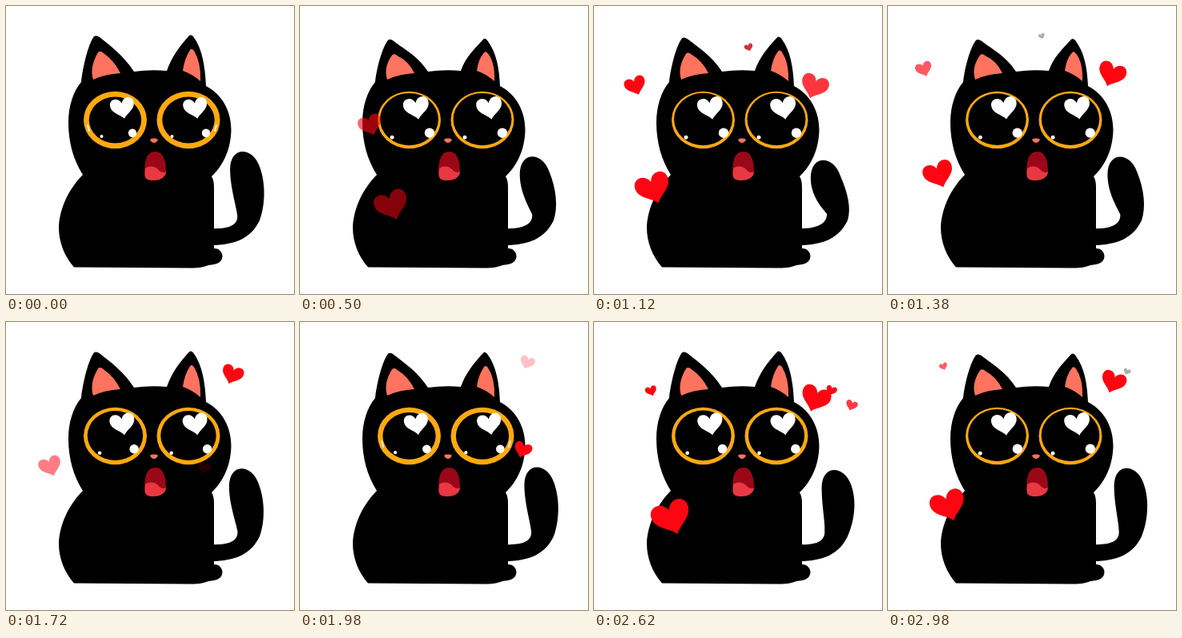
An HTML page with a canvas for the animation above (3000 ms loop, 360 px wide and 360 px high).

```html
<!DOCTYPE html>
<html lang="en">
<head>
<meta charset="utf-8">
<title>Smitten cat</title>
<style>
  html, body { margin: 0; width: 100%; height: 100%; overflow: hidden; background: #fff; }
  canvas { display: block; }
</style>
</head>
<body>
<canvas id="stage" width="360" height="360"></canvas>
<script>
const ctx = document.getElementById('stage').getContext('2d');
const LOOP = 3000;

const HEART = new Path2D('M0 .45C-.14 .24-.5 .14-.5-.16C-.5-.47-.1-.5 0-.2C.1-.5 .5-.47 .5-.16C.5 .14 .14 .24 0 .45Z');
const MOUTH = 'M187 182C197 182 200 195 200 206C199 215 191 218 184 218C177 218 173 216 173.500 209C173 195 175 182 187 182Z';
const TONGUE = 'M174 203C179 199 186 200 190 204C193 208 197 209 200 207C200 215 191 218 184 218C177 218 173 216 173.500 209Z';
const NOSE = 'M180 167Q181 165 185 165.500Q189 165 190 167Q188 171 185 171Q182 171 180 167Z';

// Hearts drift outwards while they rise; a higher lift starts the rise more slowly
const chest = { life: 1610, from: [128, 250], to: [54, 154], size: 50, lift: 2 };
const brow = { life: 1100, from: [272, 110], to: [284, 46], size: 38 };
const HEARTS = [
  { born: 360, life: 1260, from: [100, 160], to: [43, 60], size: 34 },
  { born: 350, ...chest },
  { born: 600, life: 960, from: [199, 80], to: [192, 28], size: 13, greys: true },
  { born: 960, ...brow },
  { born: 1690, life: 1200, from: [243, 185], to: [326, 81], size: 23 },
  { born: 2000, life: 1200, from: [80, 139], to: [69, 37], size: 17 },
  { born: 2240, ...chest },
  { born: 2250, life: 900, from: [292, 110], to: [299, 51], size: 15, greys: true },
  { born: 2380, ...brow },
];

const mix = (a, b, k) => a + (b - a) * k;
const unit = v => Math.min(1, Math.max(0, v));
const bell = (t, peak, width) => Math.exp(-(((t - peak) / width) ** 2));

function fill(path, color) {
  ctx.fillStyle = color;
  ctx.fill(new Path2D(path));
}

function ellipse(x, y, rx, ry, color) {
  ctx.fillStyle = color;
  ctx.beginPath();
  ctx.ellipse(x, y, rx, ry, 0, 0, 7);
  ctx.fill();
}

function heart(x, y, width, tilt, color) {
  ctx.save();
  ctx.translate(x, y);
  ctx.rotate(tilt * Math.PI / 180);
  ctx.scale(width, width);
  fill(HEART, color);
  ctx.restore();
}

// The base stays put while the tip swings left and sinks
function tail(lean) {
  const p = (x, y, k = 1) => `${x - 11 * lean * k} ${y + 13 * Math.abs(lean) * k} `;
  fill(`M256 278C275 279 ${p(290, 276, -.2)}${p(289, 262, -.2)}C${p(288, 249, .3)}${p(281, 225)}${p(281, 203)}
    C${p(281, 174)}${p(309, 174)}${p(318, 200)}C${p(326, 222, .9)}${p(324, 250, .2)}317 268C307 289 288 299 256 299Z`, '#000');
}

function body(drop) {
  const l = 37 + drop, r = 36 + drop, inner = drop * .75;
  fill(`M94 95C96 76 103 ${l + 10} 110 ${l + 1}Q113 ${l - 1} 117 ${l + 2}C131 ${l + 13} 147 62 160 82
    Q181 79 201 81C207 64 217 ${r + 14} 229 ${r + 1}Q231 ${r - 1} 234 ${r + 2}C246 ${r + 18} 249 78 250 100
    C271 111 281.500 132 281.500 155C281 180 271 200 257 213Q260 218 260 226L260 303
    C267 303 270.500 308 270.500 313C270 321 263 323 253 324C246 327 238 327.500 228 327.500L85 326.500
    C73 313 66 295 66 277C67 251 80 227 96 211C84 192 78 170 78 146C78 125 84 107 94 95Z`, '#000');
  fill(`M115 ${58 + inner}Q118 ${55 + inner} 122 ${59 + inner}Q135 68 143 84Q124 85 109 92Q104 77 115 ${58 + inner}Z`, '#ff735f');
  fill(`M230 ${55 + inner}Q232 ${52 + inner} 235 ${56 + inner}Q244 71 243 94Q233 85 221 81Q223 66 230 ${55 + inner}Z`, '#ff735f');
}

// The glints spread apart as the pupil widens (open: 0 to 1)
function eye(x, open, heartX, glintX, dotX, tickX) {
  const ring = mix(6.8, 3, open);
  const big = mix(5.2, 6.2, open), small = mix(2, 2.5, open);
  ellipse(x, 142.5, 39.5, 35.7, '#ffa90f');
  ellipse(x, 142.5 - open, 39.5 - ring, 35.7 - ring, '#000');
  heart(heartX, 127.5, mix(30, 32, open), -10, '#fff');
  ellipse(glintX, 158.7, big, big, '#fff');
  ellipse(dotX, mix(163, 164.3, open), small, small, '#fff');
  ctx.globalAlpha = unit(1.2 - 3 * open);
  ctx.strokeStyle = '#fff';
  ctx.lineWidth = 1.8;
  ctx.lineCap = 'round';
  ctx.beginPath();
  ctx.moveTo(tickX, 149);
  ctx.lineTo(tickX + 2 * Math.sign(x - tickX), 156);
  ctx.stroke();
  ctx.globalAlpha = 1;
}

function floatingHeart({ born, life, from, to, size, lift = 1, greys }, t) {
  const u = (t - born) / life;
  if (u < 0 || u > 1) return;
  const x = mix(from[0], to[0], u * (2 - u));
  const y = mix(from[1], to[1], u ** lift);
  const width = size * Math.min(1, .7 + 1.5 * u) * (1 - .6 * u * u);
  const saturation = greys ? 100 * unit((.8 - u) * 2.5) : 100;
  ctx.globalAlpha = Math.min(1, 5.5 * u, 3.5 * (1 - u));
  heart(x, y, width, from[0] < to[0] ? 20 : -20, `hsl(357 ${saturation}% 51%)`);
  ctx.globalAlpha = 1;
}

function draw(t) {
  ctx.fillStyle = '#fff';
  ctx.fillRect(0, 0, 360, 360);
  tail(bell(t, 950, 600) - .35 * bell(t, 2700, 300));
  body(2.4 * (1 - Math.cos(t / 900 * 2 * Math.PI)));

  const open = 1 - unit(bell(t, 0, 250) + bell(t, 2140, 480));
  eye(136.5, open, 145.7, mix(158, 162, open), mix(119.5, 115, open), 102);
  eye(228, open, 237, mix(250, 253, open), mix(207.5, 206, open), 263);
  fill(NOSE, '#ff735f');
  fill(MOUTH, '#9a0818');
  fill(TONGUE, '#e83842');
  HEARTS.forEach(h => floatingHeart(h, t));
}

const start = performance.now();
function tick() {
  draw((performance.now() - start) % LOOP);
  requestAnimationFrame(tick);
}
tick();
</script>
</body>
</html>
```
